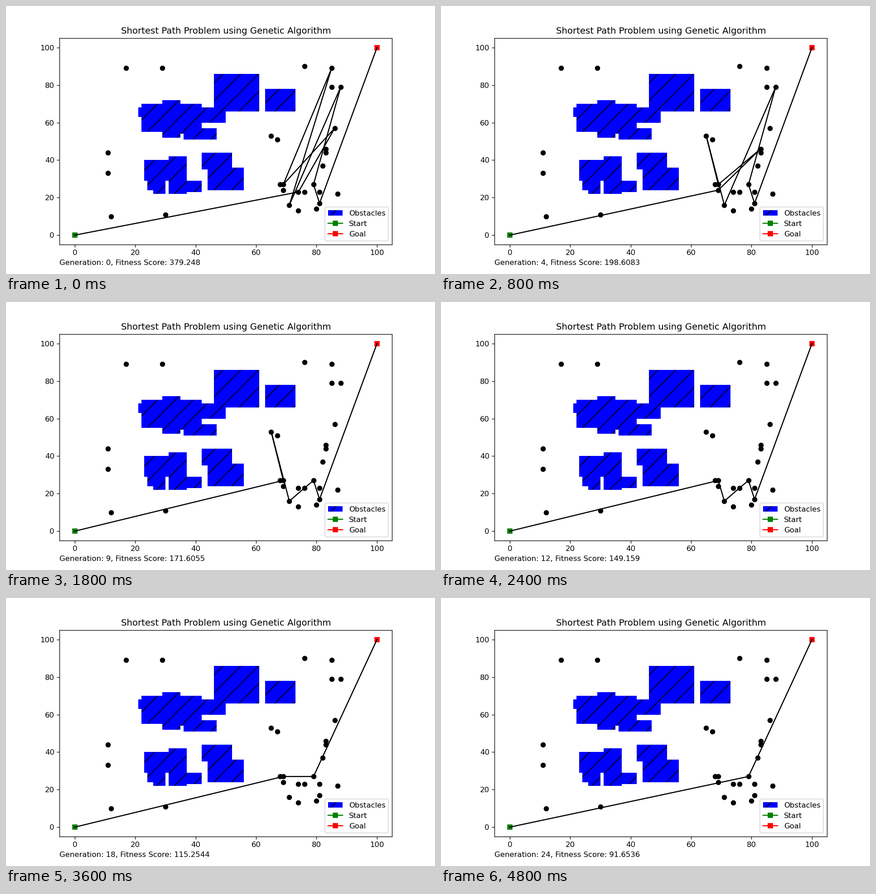
Recreate the animation shown at these times as a matplotlib script. Size 947x592 px, loop 5 s.

```python
import matplotlib.pyplot as plt
from matplotlib.animation import FuncAnimation
from matplotlib.patches import Rectangle

WIDTH, HEIGHT = 947, 592
DPI = WIDTH / 8
GENERATIONS = 25
START, GOAL = (0, 0), (100, 100)

# Obstacles as left, bottom, right, top
OBSTACLES = [
    (46, 66, 61, 86), (63, 66, 73, 78), (22, 55, 42, 70), (29, 52, 35, 72),
    (21, 63, 29, 68), (35, 54, 42, 70), (42, 60, 50, 68), (36, 51, 47, 57),
    (23, 29, 31, 40), (24, 24, 30, 30), (26, 22, 30, 30), (31, 22, 37, 42),
    (37, 23, 42, 29), (42, 35, 52, 44), (44, 24, 56, 36),
]

A, B, C, D = (69, 27), (79, 27), (81, 17), (71, 16)
E, F, G, H = (88, 79), (65, 53), (76, 23), (87, 22)
I, J, K, L = (74, 23), (86, 57), (85, 89), (69, 24)
M, N, O, P = (83, 46), (67, 51), (74, 13), (82, 37)
OTHERS = [
    (17, 89), (29, 89), (76, 90), (85, 79), (83, 44), (68, 27), (81, 23),
    (80, 14), (11, 44), (11, 33), (12, 10), (30, 11),
]
POINTS = [A, B, C, D, E, F, G, H, I, J, K, L, M, N, O, P] + OTHERS

# Best route and score, keyed by the generation that introduced them
ROUTES = {
    0: [I, J, A, K, D, E, B, C],
    1: [I, J, A, K, D, E, B, H],
    2: [A, N, O, P, E, B, H, G],
    3: [L, M, A, F, D, E, B, C],
    7: [A, F, D, E, B, C],
    9: [A, F, D, G, B, C],
    11: [A, D, G, B, C],
    13: [A, D, G, B],
    16: [A, D, G],
    18: [A, B],
    21: [A],
    22: [B],
}
SCORES = {
    0: 379.248, 1: 351.4706, 2: 329.1514, 3: 242.7516, 4: 198.6083,
    7: 187.3428, 8: 171.6055, 10: 162.4937, 11: 157.208, 12: 149.159,
    13: 143.351, 14: 138.961, 16: 124.3744, 17: 115.2544, 19: 105.0813,
    22: 97.4132, 23: 93.1266, 24: 91.6536,
}


def latest(table, generation):
    return table[max(key for key in table if key <= generation)]


fig, ax = plt.subplots(figsize=(8, (HEIGHT + 1e-6) / DPI), dpi=DPI)
ax.set(xlim=(-5, 105), ylim=(-5, 105))
ax.set_title("Shortest Path Problem using Genetic Algorithm")

for i, (left, bottom, right, top) in enumerate(OBSTACLES):
    ax.add_patch(Rectangle((left, bottom), right - left, top - bottom,
                           facecolor="blue", hatch="/",
                           label="_" if i else "Obstacles"))
ax.plot(*zip(*POINTS), "ko")
ax.plot(*START, "gs-", label="Start")
ax.plot(*GOAL, "rs-", label="Goal")
ax.legend(loc="lower right")

route_line, = ax.plot([], [], "k-")
caption = ax.text(0, -0.1, "", transform=ax.transAxes)


def update(generation):
    route_line.set_data(*zip(START, *latest(ROUTES, generation), GOAL))
    score = latest(SCORES, generation)
    caption.set_text(f"Generation: {generation}, Fitness Score: {score}")
    return route_line, caption


anim = FuncAnimation(fig, update, frames=GENERATIONS, interval=200, repeat=True)
plt.show()
```
